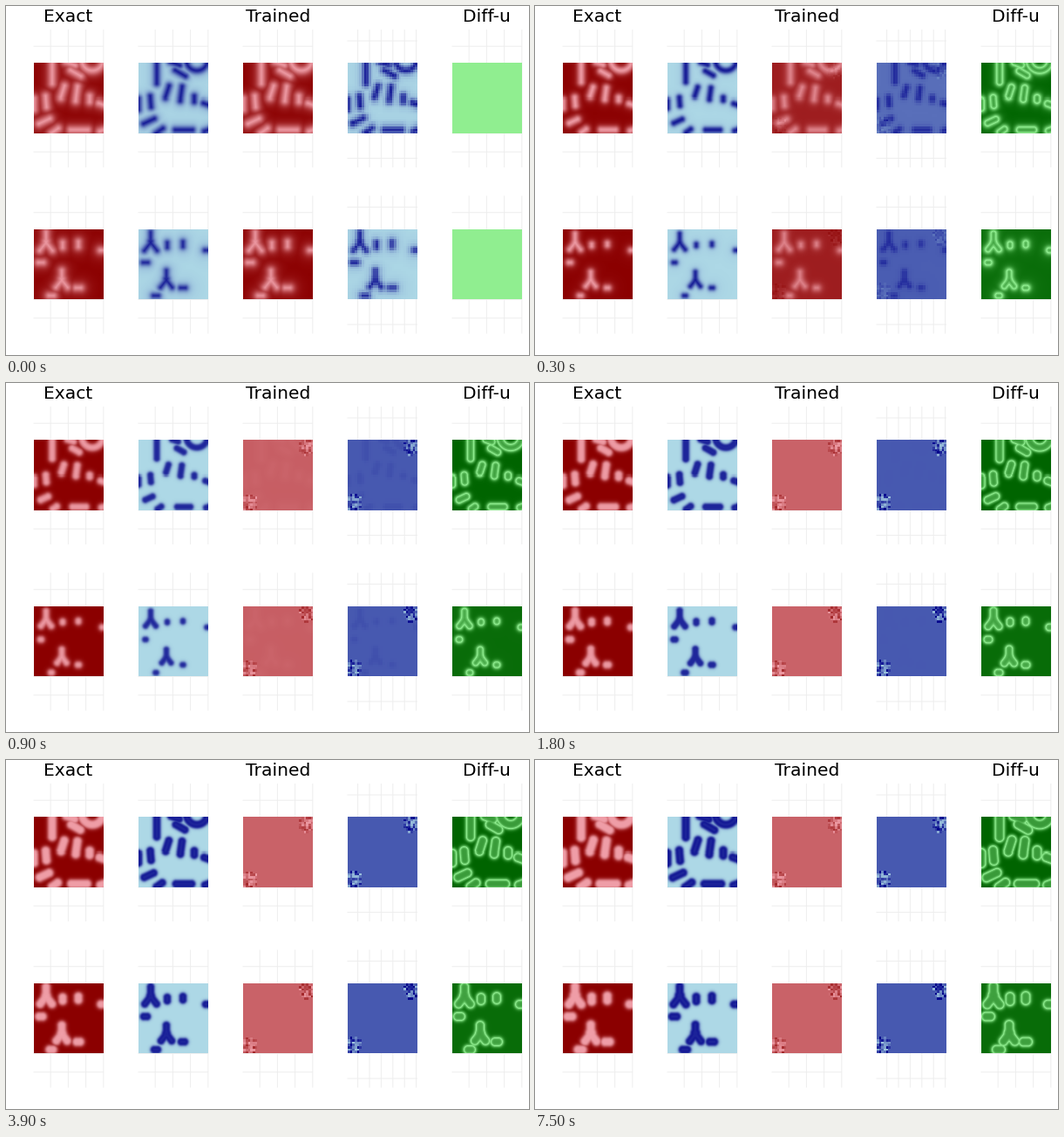
A matplotlib script that plays this animation: 600x400 px, repeating every 7600 ms.

```python
import numpy as np
import matplotlib.pyplot as plt
from matplotlib.animation import FuncAnimation
from matplotlib.colors import LinearSegmentedColormap

FRAMES, INTERVAL = 76, 100
SIZE, CELLS = 80, 30
ROW_SHIFT = 190.5
U_REST, V_REST = 0.46, 0.585

REDS = LinearSegmentedColormap.from_list("reds", ["lightpink", "darkred"])
BLUES = LinearSegmentedColormap.from_list("blues", ["lightblue", "darkblue"])
GREENS = LinearSegmentedColormap.from_list("greens", ["lightgreen", "darkgreen"])
CMAPS = [REDS, BLUES, REDS, BLUES, GREENS]

X, Y = np.meshgrid(np.arange(SIZE) + 0.5, np.arange(SIZE) + 0.5)
TO_CELL = ((np.arange(CELLS) + 0.5) * SIZE / CELLS).astype(int)
TO_PIXEL = np.arange(SIZE) * CELLS // SIZE


def tripod(x, y, arm):
    """Three rods meeting at one point: up, down left and down right."""
    for tilt in (-90, 52, 128):
        a = np.radians(tilt)
        yield x + arm / 2 * np.cos(a), y + arm / 2 * np.sin(a), tilt, arm / 2


# Rods: centre x, centre y, tilt in degrees, half length.
TOP = [(21, 11, 90, 11), (48, 12, 30, 5), (42, 1, 20, 4), (33, 33, 108, 5),
       (49, 35, 98, 6), (64, 41, 90, 1), (79, 47, 20, 3), (14, 44, 85, 4),
       (0, 47, 90, 4), (12, 66, 155, 5), (24, 77, 145, 3), (52, 76, 0, 8),
       (80, 76, 160, 3)]
SPOTS = [(33, 18), (51, 17), (79, 24), (8, 38), (51, 67), (20, 76)]
BOTTOM = [*tripod(14, 15, 10), *tripod(32, 58, 9),
          *((x, y, 90 if y < 20 else 0, 1) for x, y in SPOTS)]


def rod_distance(x, y, tilt, half, extra):
    a = np.radians(tilt)
    along = (X - x) * np.cos(a) + (Y - y) * np.sin(a)
    across = (Y - y) * np.cos(a) - (X - x) * np.sin(a)
    return np.hypot(across, np.maximum(np.abs(along) - max(half + extra, 0), 0))


def distance(row, t):
    # Rods start smeared out, contract quickly, then lengthen slowly.
    extra = 3 * np.exp(-(t / 0.3) ** 2) + 3.2 * (1 - np.exp(-t / 3.5)) - 1.2
    layers = [rod_distance(*rod, extra) for rod in (TOP, BOTTOM)[row]]
    if row == 0:
        layers.append(np.abs(np.hypot(X - 67, Y + 3) - 12))
    return -0.6 * np.log(sum(np.exp(-d / 0.6) for d in layers))


def blobs(d, radius, soft):
    return 1 / (1 + np.exp((d - radius) / soft))


def corner_noise(row):
    cx, cy = np.meshgrid(np.arange(CELLS), np.arange(CELLS))
    mask = (np.hypot(cx - 26.6, cy - 2.6) < 3.5) | (np.hypot(cx - 2.3, cy - 26.4) < 3.7)
    return mask * np.random.default_rng(11 + row).uniform(-1, 1, (CELLS, CELLS))


NOISE = [corner_noise(row) for row in range(2)]


def fields(row, t):
    d = distance(row, t)
    radius = 3.2 + 2 * (1 - np.exp(-t / 2)) - 0.5 * row * np.exp(-t / 3)
    soft = 1.2 + 1.1 * np.exp(-t / 0.4)
    settled = 1 - np.exp(-(t / 0.6) ** 2)
    halo = 0.3 * np.exp(-np.maximum(d, 0) / 8) * np.exp(-t / 0.3)
    core = 0.08 * settled * np.exp(-(d / 2.2) ** 2)

    body = blobs(d, radius, soft)
    u = 1 - np.clip(0.96 * body + halo * (1 - body) - core, 0, 1)
    body = blobs(d, radius - 0.5, 0.75 * soft)
    v = np.clip(body + 0.6 * halo * (1 - body) - 2 * core, 0, 1)

    # The model forgets the pattern and settles on flat values with noisy corners.
    noise = settled * NOISE[row]
    blurred = 1 - 0.96 * blobs(d, radius, soft + 2 * settled)
    u_model = U_REST + np.exp(-(t / 0.5) ** 2) * (blurred - U_REST)
    u_model = u_model + 0.32 * noise[np.ix_(TO_PIXEL, TO_PIXEL)]
    if t == 0:
        u_model = u

    cells = v[np.ix_(TO_CELL, TO_CELL)]
    keep = np.exp(-(t / (0.25 - 0.05 * row)) ** 3)
    trace = 0.5 * np.exp(-t / 0.4) * (1 - keep)
    v_model = V_REST + keep * (cells - V_REST) + trace * cells + 0.5 * noise

    diff = np.abs(u - U_REST) / (1 - U_REST) * (1 - 0.06 * row)
    return u, v, u_model, v_model, diff * (t > 0)


fig = plt.figure(figsize=(6, 4), dpi=100, facecolor="white")
ax = fig.add_axes([0, 0, 1, 1])
ax.axis("off")

for x, label in [(70.8, "Exact"), (312.3, "Trained"), (551.3, "Diff-u")]:
    ax.text(x, 18, label, fontsize=14.6, family="DejaVu Sans", ha="center", va="baseline")

grid = dict(color="0.935", linewidth=0.72, zorder=0, snap=False)
panels = []
for row in range(2):
    shift = row * ROW_SHIFT
    top, bottom = (65, 146) if row == 0 else (256, 336)
    for col, cmap in enumerate(CMAPS):
        left = 31 + 120 * col
        coarse = col == 3
        xs = left + (12.6 + 13.4 * np.arange(6) if coarse else 20.2 * np.arange(1, 5))
        ys = np.array([40, 174.5] if coarse else [46.2, 145.9, 167.2])
        ax.vlines(xs, 27 + shift, 185 + shift, **grid)
        ax.hlines(ys + shift, left + 0.5, left + 81, **grid)
        n = CELLS if coarse else SIZE
        panels.append(ax.imshow(np.zeros((n, n)), cmap=cmap, vmin=0, vmax=1,
                                extent=(left + 1, left + 81, bottom, top),
                                interpolation="nearest", aspect="auto", zorder=2))
ax.set_xlim(0, 600)
ax.set_ylim(400, 0)


def update(frame):
    t = frame * INTERVAL / 1000
    for panel, values in zip(panels, [*fields(0, t), *fields(1, t)]):
        panel.set_data(values)
    return panels


anim = FuncAnimation(fig, update, frames=FRAMES, interval=INTERVAL,
                     repeat=True, repeat_delay=0)
plt.show()
```
